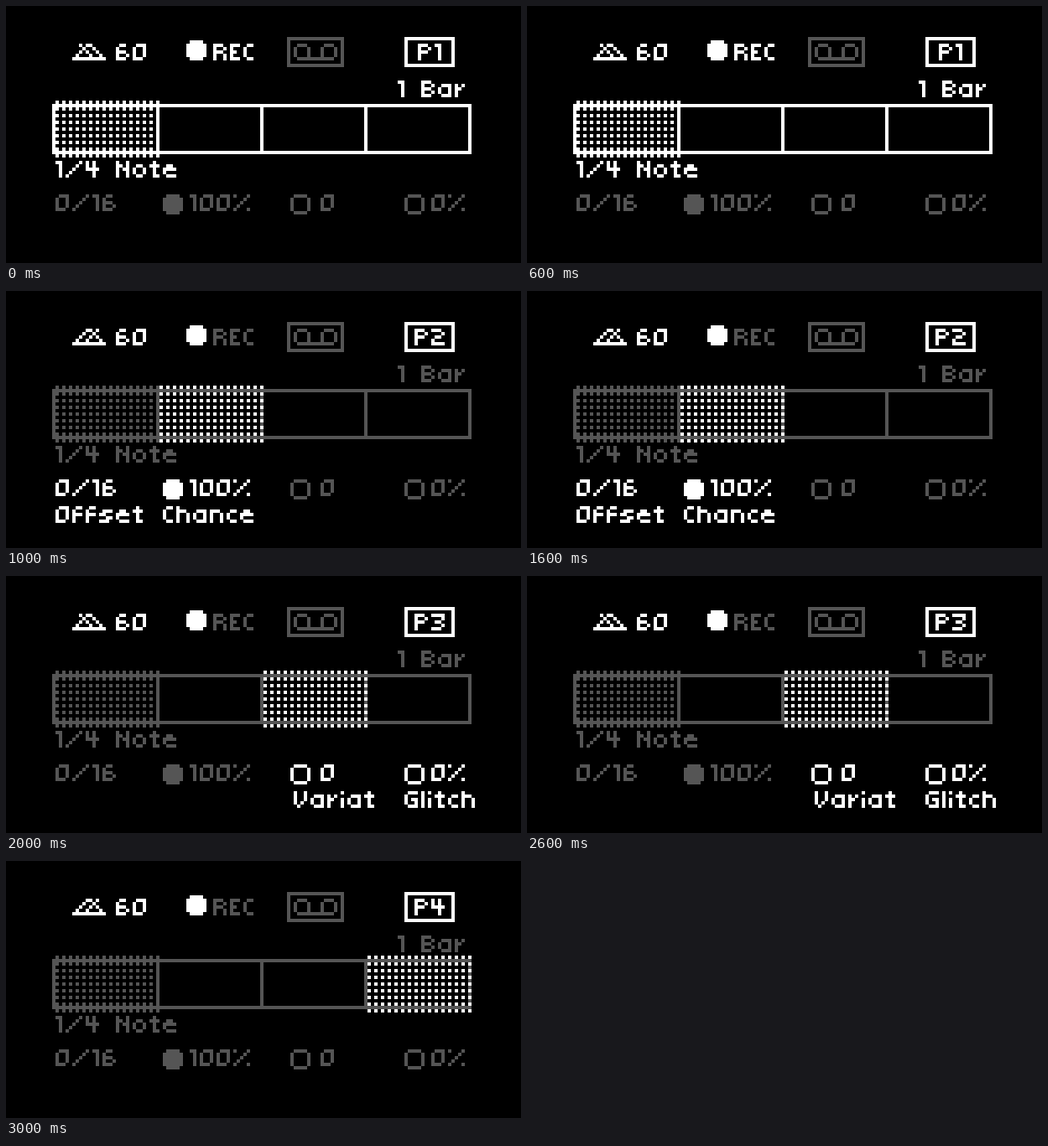
Write an HTML page that moves like this. It is 614x307 px and loops after 4000 ms.

```html
<!DOCTYPE html>
<html lang="en">
<head>
<meta charset="utf-8">
<title>Step sequencer display</title>
<style>
  html, body { margin: 0; width: 100%; height: 100%; overflow: hidden; background: #000; }
  svg { display: block; width: 614px; height: 307px; }
  path { fill: none; stroke-width: 1; stroke-linecap: square; }
</style>
</head>
<body>
<svg viewBox="0 0 614 307" shape-rendering="crispEdges">
  <!-- one unit is one display cell -->
  <g id="screen" transform="translate(1 3) scale(4)"></g>
</svg>
<script>
const ON = '#fff', DIM = '#555', STEP = 1000, STEPS = 4;
const screen = document.getElementById('screen');

// Pixel font: width in cells, then strokes on a five-row grid.
const FONT = {
  ' ': [3, ''],
  '0': [4, 'M1 0h2v3M0 1v3h2'],
  '1': [2, 'M0 0h1v4'],
  '2': [4, 'M0 0h2M3 1h0M1 2h1M0 3v1h3'],
  '3': [4, 'M0 0h3v1M1 2h1M3 3h0M0 4h2'],
  '4': [4, 'M0 0v2h3M2 0v4'],
  '6': [4, 'M1 0h1M0 1v3h2M0 2h2M3 3h0'],
  '/': [5, 'M0 4h0m1 -1h0m1 -1h0m1 -1h0m1 -1h0'],
  '%': [5, 'M0 4h0m1 -1h0m1 -1h0m1 -1h0m1 -1h0M0 0h0M4 4h0'],
  B: [4, 'M0 0v4h2M0 0h2M0 2h2M3 1h0M3 3h0'],
  C: [3, 'M1 0h1M0 1v2M1 4h1'],
  E: [3, 'M2 0h-2v4h2M0 2h1'],
  G: [4, 'M1 0h2M0 1v2M1 4h2v-2h-1'],
  N: [4, 'M0 0v4M1 1h0M2 2h0M3 0v4'],
  O: [4, 'M1 0h2v3M0 1v3h2'],
  P: [4, 'M0 4v-4h2M3 1h0M0 2h2'],
  R: [4, 'M0 4v-4h2M3 1h0M0 2h2M3 3v1'],
  V: [4, 'M0 0v2M3 0v2M0 3h0M2 3h0M1 4h0'],
  a: [4, 'M1 1h2v3h-2M0 2v1'],
  c: [3, 'M1 1h1M0 2v1M1 4h1'],
  e: [4, 'M1 1h1M0 2h3M0 3h0M1 4h2'],
  f: [3, 'M1 0h1M0 1v3M0 2h2'],
  h: [4, 'M0 0v4M0 1h2M3 2v2'],
  i: [1, 'M0 0h0M0 2v2'],
  l: [1, 'M0 0v4'],
  n: [4, 'M0 4v-3h2M3 2v2'],
  o: [4, 'M1 1h1M0 2v1M3 2v1M1 4h1'],
  r: [3, 'M0 1v3M1 2h0M2 1h0'],
  s: [4, 'M1 1h2M0 2h1M2 3h1M0 4h2'],
  t: [3, 'M1 0v4h1M0 1h2']
};

const DISC = 'M1 0h3M0 1h5M0 2h5M0 3h5M0 4h5M1 5h3';
const RING = 'M1 0h3M0 1v3M5 1v3M1 5h3';
const REELS = 'M3 2h2M2 3v2M6 3v2M11 2h2M10 3v2M14 3v2M3 6h10';
const frame = (w, h) => `M0 0h${w - 1}v${h - 1}h${1 - w}z`;

function make(tag, attrs, parent) {
  const node = document.createElementNS('http://www.w3.org/2000/svg', tag);
  for (const key in attrs) node.setAttribute(key, attrs[key]);
  return parent.appendChild(node);
}

function shape(d, x, y, color = ON) {
  return make('path', { d, transform: `translate(${x} ${y})`, stroke: color }, screen);
}

function textWidth(str) {
  return [...str].reduce((sum, ch) => sum + FONT[ch][0] + 1, -1);
}

function text(str, x, y, color = ON) {
  const group = make('g', { role: 'img', 'aria-label': str, stroke: color }, screen);
  for (const ch of str) {
    const [width, d] = FONT[ch];
    if (d) make('path', { d, transform: `translate(${x} ${y})` }, group);
    x += width + 1;
  }
  return group;
}

function dots(cols, rows) {
  let d = '';
  for (let r = 0; r < rows; r++)
    for (let c = 0; c < cols; c++) d += `M${2 * c} ${2 * r}h0`;
  return d;
}

// Metronome body and its two arm positions
let body = 'M0 4h9M4 0h1', arms = ['', ''];
for (let i = 0; i < 4; i++) {
  if (i) body += `M${4 - i} ${i}h${0}M${5 + i} ${i}h0`;
  arms[0] += `M${2 + i} ${i}h0`;
  arms[1] += `M${7 - i} ${i}h0`;
}
shape(body, 20, 11);
const arm = shape(arms[0], 20, 11);

text('60', 33, 11);
shape(DISC, 54, 10);
shape(frame(17, 9) + REELS, 84, 9, DIM);
shape(frame(15, 9), 119, 9);

const pages = Array.from({ length: STEPS }, (_, i) => {
  const label = 'P' + (i + 1);
  return text(label, 126.5 - textWidth(label) / 2, 11);
});

// Parts lit only on the first step
const bar = [
  text('REC', 62, 11),
  text('1 Bar', 117, 22),
  shape(frame(125, 15) + 'M31 0v14M62 0v14M93 0v14', 14, 29),
  shape(dots(16, 9), 15, 28),
  text('1/4 Note', 15, 46)
];
const cursor = shape(dots(16, 9), 15, 28);

// Lower row: values, and the labels shown while lit
const params = [
  { step: 1, parts: [text('0/16', 15, 56)], label: text('Offset', 15, 64) },
  { step: 1, parts: [shape(DISC, 47, 56), text('100%', 55, 56)], label: text('Chance', 47, 64) },
  { step: 2, parts: [shape(RING, 85, 56), text('0', 94, 56)], label: text('Variat', 86, 64) },
  { step: 2, parts: [shape(RING, 119, 56), text('0%', 127, 56)], label: text('Glitch', 119, 64) }
];

const paint = (nodes, lit) => nodes.forEach(n => n.setAttribute('stroke', lit ? ON : DIM));
const toggle = (node, visible) => node.setAttribute('visibility', visible ? 'visible' : 'hidden');

function draw(step) {
  arm.setAttribute('d', arms[step % 2]);
  pages.forEach((page, i) => toggle(page, i === step));
  paint(bar, step === 0);
  cursor.setAttribute('transform', `translate(${15 + 31 * step} 28)`);
  for (const p of params) {
    paint(p.parts, p.step === step);
    toggle(p.label, p.step === step);
  }
}

const start = performance.now();
function tick() {
  draw(Math.floor((performance.now() - start) / STEP) % STEPS);
  requestAnimationFrame(tick);
}
tick();
</script>
</body>
</html>
```
